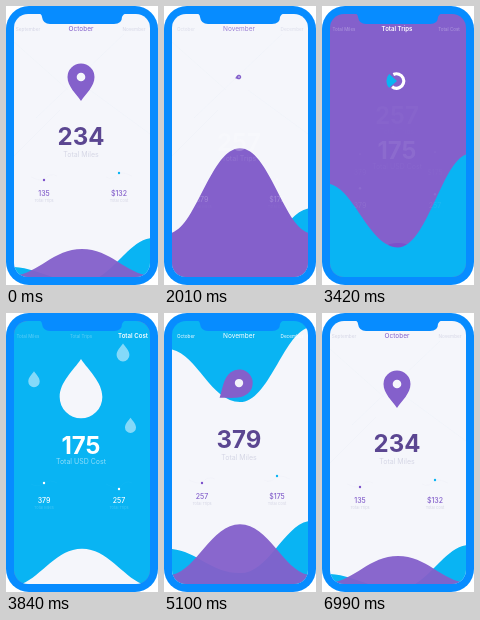
Write an HTML page with a canvas that moves like this. It is 152x279 px and loops after 7350 ms.

```html
<!DOCTYPE html>
<html>
<head>
<meta charset="utf-8">
<style>
html, body { margin: 0; width: 100%; height: 100%; overflow: hidden; background: #fff; }
canvas { display: block; width: 152px; height: 279px; }
</style>
</head>
<body>
<canvas></canvas>
<script>
const canvas = document.querySelector('canvas');
const c = canvas.getContext('2d');
const dpr = window.devicePixelRatio || 1;
canvas.width = 152 * dpr;
canvas.height = 279 * dpr;

const LOOP = 7350, MOVE = 720;
const FRAME = '#078cff', TAU = Math.PI * 2;
const PAPER = [245, 246, 251], WHITE = [255, 255, 255], PURPLE = [124, 80, 203];
const HILL = [132, 96, 203], CYAN = [9, 180, 243], INK = [91, 70, 145], MIST = [213, 214, 229];

// Screens: 0 October, 1 November, 2 trips, 3 cost. Each step: start, from, to.
const STEPS = [[390, 0, 1], [1800, 1, 2], [3240, 2, 3], [4680, 3, 1], [5940, 1, 0]];
const MONTHS = ['September', 'October', 'November', 'December'];
const TABS = ['Total Miles', 'Total Trips', 'Total Cost'];
const YEAR_VALUES = [['234', '135', '132'], ['379', '257', '175']];
// Kinds (miles, trips, cost) in the centre, left and right of each screen.
const LAYOUT = [[0, 1, 2], [0, 1, 2], [1, 0, 2], [2, 0, 1]];
const DOTS = [[174, 167], [174, 167], [169, 167], [170, 176]];
const HILLS = [[270, 243, 270], [265, 218, 265]];
const TIDES = [[261, 276, 232], [232, 258, 202]];

const lerp = (a, b, p) => a + (b - a) * p;
const lerpAll = (a, b, p) => a.map((v, i) => lerp(v, b[i], p));
const clamp = v => Math.max(0, Math.min(1, v));
const linear = (u, a, b) => clamp((u - a) / (b - a));
const ramp = (u, a, b) => (1 - Math.cos(Math.PI * linear(u, a, b))) / 2;
const back = (u, a, b) => {
  const v = linear(u, a, b) - 1;
  return 1 + 2.7 * v ** 3 + 1.7 * v * v;
};
const rgb = (color, alpha = 1) => `rgba(${color.map(Math.round)},${alpha})`;

function text(str, x, y, size, color, alpha = 1, weight = 400) {
  if (alpha <= 0) return;
  c.font = `${weight} ${size}px Inter, sans-serif`;
  c.textAlign = 'center';
  c.fillStyle = rgb(color, alpha);
  c.fillText(str, x, y);
}

function disc(x, y, r, color, alpha = 1) {
  c.fillStyle = rgb(color, alpha);
  c.beginPath();
  c.arc(x, y, Math.max(0, r), 0, TAU);
  c.fill();
}

function ground(color) {
  c.fillStyle = rgb(color);
  c.fillRect(0, 0, 152, 279);
}

// Fills everything below a smooth curve through left, middle and right heights.
function wave(color, [left, mid, right], dx = 0, alpha = 1) {
  c.fillStyle = rgb(color, alpha);
  c.beginPath();
  c.moveTo(-40, 300);
  c.lineTo(-40, left);
  c.lineTo(4 + dx, left);
  c.bezierCurveTo(31 + dx, left, 46 + dx, mid, 76 + dx, mid);
  c.bezierCurveTo(106 + dx, mid, 121 + dx, right, 148 + dx, right);
  c.lineTo(190, right);
  c.lineTo(190, 300);
  c.fill();
}

function streets(dx) {
  c.strokeStyle = '#eff1f8';
  c.lineWidth = 0.6;
  c.beginPath();
  for (const [x1, y1, x2, y2] of [[8, 36, 62, 84], [30, 112, 118, 28], [84, 84, 144, 128], [8, 150, 54, 104]]) {
    c.moveTo(x1 + dx, y1);
    c.lineTo(x2 + dx, y2);
  }
  c.stroke();
}

// Teardrop with its tip down at angle 0.
function drop(x, y, r, angle, color, alpha = 1) {
  if (r <= 0) return;
  c.save();
  c.translate(x, y);
  c.rotate(angle);
  c.scale(r, r);
  c.fillStyle = rgb(color, alpha);
  c.beginPath();
  c.moveTo(0, 1.78);
  c.bezierCurveTo(-0.35, 1.25, -1, 0.7, -1, 0);
  c.arc(0, 0, 1, Math.PI, TAU);
  c.bezierCurveTo(1, 0.7, 0.35, 1.25, 0, 1.78);
  c.fill();
  c.restore();
}

function pin(scale, angle) {
  drop(75, 71, 13.5 * scale, angle, HILL);
  disc(75, 71, 4.3 * scale, PAPER);
}

function donut(sweep, wedge, scale, labels) {
  c.save();
  c.translate(74.5, 75);
  c.scale(scale, scale);
  if (sweep > 0) {
    c.strokeStyle = '#fff';
    c.lineWidth = 9;
    c.beginPath();
    c.arc(0, 0, 20.8, -2.02, -2.02 + 4.25 * sweep);
    c.stroke();
  }
  if (wedge > 0) {
    c.fillStyle = rgb(CYAN);
    c.beginPath();
    c.moveTo(1.5, 0);
    c.arc(0, 0, 29 * wedge, 2.4, 3.9);
    c.fill();
  }
  c.restore();
  disc(38, 75, 1.2, CYAN, labels);
  disc(112.5, 75, 1.2, WHITE, labels);
  text('102', 25.5, 77.5, 7, WHITE, labels, 500);
  text('152', 124.5, 76.5, 7, WHITE, labels, 500);
  [['Business', 23], ['Personal', 126]].forEach(([word, x]) => {
    text(word, x, 83.5, 3.9, WHITE, labels * 0.3);
    text('Trips', x + (x < 75 ? 4 : -4), 88.5, 3.9, WHITE, labels * 0.3);
  });
}

function rain(alpha, rise) {
  for (const [x, y, r] of [[117, 42, 6.4], [28, 68.5, 5.7], [124.5, 114.5, 5.5]])
    drop(x, y - rise, r, Math.PI, WHITE, alpha * 0.5);
}

function spark(x, y, color, alpha, lineColor, lineAlpha) {
  c.strokeStyle = rgb(lineColor, lineAlpha * alpha);
  c.lineWidth = 0.5;
  c.beginPath();
  c.moveTo(x - 13, 171);
  c.quadraticCurveTo(x - 6, 175, x, y);
  c.quadraticCurveTo(x + 6, 166, x + 13, 170);
  c.stroke();
  disc(x, y, 1.2, color, alpha);
}

// The large number, the two small ones and their dots.
function stats(screen, dx, dy, alpha) {
  if (alpha <= 0) return;
  const light = screen < 2;
  const values = YEAR_VALUES[Math.min(screen, 1)];
  const [main, ...sides] = LAYOUT[screen];
  const line = light ? MIST : WHITE;
  const top = screen === 3 ? 141 : 139;
  c.save();
  c.translate(dx, dy);
  text(values[main], 75, top, 24, light ? INK : WHITE, alpha, 700);
  text(main === 2 ? 'Total USD Cost' : TABS[main], 75, top + (light ? 12.3 : 9.5), 7, line, alpha * (light ? 1 : 0.55));
  sides.forEach((kind, i) => {
    const x = i ? 113 : 38;
    spark(x, DOTS[screen][i], light ? (i ? CYAN : PURPLE) : WHITE, alpha, line, light ? 0.2 : 0.04);
    text((kind === 2 ? '$' : '') + values[kind], x, 189.5, 7, light ? HILL : WHITE, alpha, 500);
    text(TABS[kind], x, 195.5, 3.9, line, alpha * (light ? 1 : 0.22));
  });
  c.restore();
}

function monthTabs(pos, white, alpha) {
  MONTHS.forEach((name, i) => {
    const d = Math.abs(i - pos);
    const near = clamp(d);
    const color = lerpAll(lerpAll(HILL, MIST, near), WHITE, white);
    text(name, 75 + (i - pos) * 53, 25, 6.5 - 1.8 * near, color, alpha * clamp(2 - d));
  });
}

function modeTabs(selected, alpha) {
  TABS.forEach((name, i) => {
    const on = clamp(1 - Math.abs(i - selected));
    text(name, [22, 75, 127][i], 25, lerp(4.5, 6.1, on), WHITE, alpha * lerp(0.35, 1, on), on > 0.5 ? 600 : 400);
  });
}

function drawMonths(from, to, u) {
  const dir = to - from;
  const pos = lerp(from, to, ramp(u, 0, 0.7));
  const height = back(u, 0.25, 1.4) * ramp(u, 0.1, 0.6);
  const shift = -dir * 25 * Math.sin(Math.PI * linear(u, 0, 1));
  ground(PAPER);
  streets(shift);
  wave(CYAN, lerpAll(TIDES[from], TIDES[to], ramp(u, 0, 0.8)), shift);
  wave(HILL, lerpAll(HILLS[from], HILLS[to], height), shift, 0.95);
  pin(1, dir * 0.63 * Math.sin(Math.PI * linear(u, 0, 1) ** 0.7));
  for (const month of [0, 1])
    stats(month, (month - pos) * 145, 0, 1 - 0.8 * Math.abs(month - pos));
  monthTabs(pos + 1, 0, 1);
}

function drawBackdrop(to, u) {
  if (to === 2) {
    ground(PAPER);
    streets(0);
    wave(CYAN, TIDES[1]);
    const edge = lerp(265, -10, ramp(u, 0.1, 0.9));
    wave(HILL, [edge, lerp(218, -10, ramp(u, 0, 0.75)), edge], 0, lerp(0.95, 1, ramp(u, 0, 0.3)));
    wave(PURPLE, lerpAll([310, 300, 310], [278, 237, 278], back(u, 0.4, 1.2)));
    wave(CYAN, lerpAll([300, 310, 300], [241, 265, 211], back(u, 0.4, 1.2)));
  } else if (to === 3) {
    ground(HILL);
    wave(PURPLE, [278, 237, 278]);
    wave(CYAN, [lerp(241, -10, ramp(u, 0, 0.75)), lerp(265, -10, ramp(u, 0.1, 0.9)), lerp(211, -10, ramp(u, 0, 0.7))]);
    wave(PAPER, lerpAll([305, 300, 305], [276, 241, 276], back(u, 0.3, 1.1)));
  } else {
    ground(CYAN);
    wave(PAPER, [lerp(276, 5, ramp(u, 0, 0.75)), lerp(241, 0, ramp(u, 0.1, 0.93)), lerp(276, -20, ramp(u, 0, 0.75))]);
    wave(CYAN, lerpAll([290, 290, 290], TIDES[1], ramp(u, 0, 0.7)));
    wave(HILL, lerpAll([300, 300, 300], HILLS[1], back(u, 0.1, 0.8)), 0, 0.95);
  }
}

function drawIcon(to, u) {
  if (to === 2) {
    pin(1 - ramp(u, 0, 0.4), ramp(u, 0, 0.4) * 1.5);
    donut(ramp(u, 0.3, 0.9), back(u, 0.55, 1.15) * linear(u, 0.55, 0.6), 1, ramp(u, 0.6, 1));
  } else if (to === 3) {
    const out = 1 - ramp(u, 0, 0.42);
    if (out > 0) donut(1, 1, out, 1 - ramp(u, 0, 0.25));
    if (u > 0.35) drop(75, 84, 21.3 * back(u, 0.35, 0.85), Math.PI, PAPER);
    rain(ramp(u, 0.35, 0.75), 60 * (1 - ramp(u, 0.3, 0.84)));
  } else {
    rain(1 - ramp(u, 0, 0.35), -50 * ramp(u, 0, 0.4));
    const p = ramp(u, 0, 0.65);
    const y = lerp(84, 71, back(u, 0, 0.8));
    drop(75, y, lerp(21.3, 13.5, p), Math.PI * (1 - ramp(u, 0, 0.92)), lerpAll(PAPER, HILL, ramp(u, 0, 0.5)));
    disc(75, y, 4.3 * p, PAPER, p);
  }
}

function drawModes(from, to, u) {
  drawBackdrop(to, u);
  drawIcon(to, u);
  stats(from, 0, -30 * ramp(u, 0, 0.4), 1 - ramp(u, 0, 0.28));
  stats(to, 0, 48 * (1 - back(u, 0.1, 0.8)), ramp(u, 0.2, 0.5));
  if (to === 2) {
    monthTabs(2, ramp(u, 0.3, 0.6), 1 - ramp(u, 0.2, 0.5));
    modeTabs(1, ramp(u, 0.4, 0.8));
  } else if (to === 3) {
    modeTabs(1 + ramp(u, 0.2, 0.8), 1);
  } else {
    modeTabs(2, 1 - ramp(u, 0, 0.3));
    monthTabs(2, 1 - ramp(u, 0.6, 0.95), ramp(u, 0.2, 0.5));
  }
}

function draw(t) {
  c.setTransform(dpr, 0, 0, dpr, 0, 0);
  c.clearRect(0, 0, 152, 279);
  c.fillStyle = FRAME;
  c.beginPath();
  c.roundRect(0, 0, 152, 279, 23);
  c.fill();

  c.save();
  c.beginPath();
  c.roundRect(8, 8, 136, 263, 14);
  c.clip();
  const step = STEPS.filter(s => s[0] <= t).pop();
  const [start, from, to] = step || STEPS[4];
  const u = step ? (t - start) / MOVE : 9;
  (from < 2 && to < 2 ? drawMonths : drawModes)(from, to, u);
  c.restore();

  c.fillStyle = FRAME;
  c.beginPath();
  c.moveTo(32, 7);
  c.quadraticCurveTo(36, 8, 36, 11);
  c.quadraticCurveTo(37, 18, 44, 18);
  c.lineTo(108, 18);
  c.quadraticCurveTo(116, 18, 116, 11);
  c.quadraticCurveTo(117, 8, 121, 7);
  c.fill();
}

function tick() {
  draw(performance.now() % LOOP);
  requestAnimationFrame(tick);
}
tick();
</script>
</body>
</html>
```
